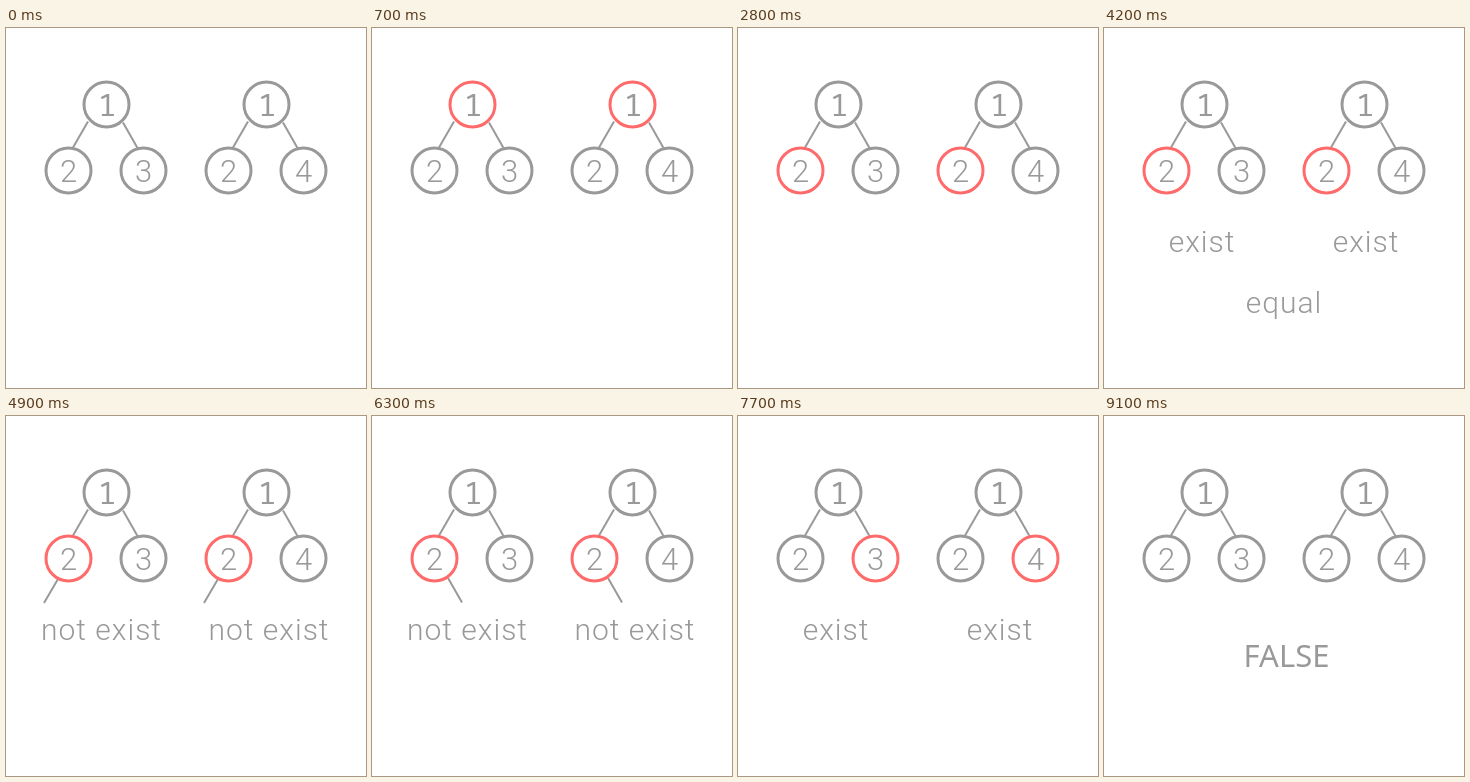
These frames come from a looping animation (360x360 px, 9800 ms). An HTML page:

```html
<!DOCTYPE html>
<html lang="en">
<head>
<meta charset="utf-8">
<title>Comparing two trees</title>
<style>
  html, body { margin: 0; width: 100%; height: 100%; overflow: hidden; background: #fff; }
  svg { display: block; width: 100%; height: 100%; }
  circle { fill: #fff; stroke: #999; stroke-width: 3; }
  circle.active { stroke: #ff6b6b; }
  line { stroke: #999; stroke-width: 2; }
  text { fill: #999; text-anchor: middle; font: 300 31px Roboto, sans-serif; font-stretch: 80%; }
  text.one { font-family: "Noto Sans Mono", monospace; }
  text.word { font-size: 30px; letter-spacing: 1px; }
  text.result { font: 400 31px "Noto Sans", sans-serif; }
</style>
</head>
<body>
<svg id="stage" viewBox="0 0 360 360"></svg>
<script>
const STEP = 700;
const stage = document.getElementById("stage");

// Each step: active node, word under the trees, verdict, side of the missing child.
const steps = [
  {},
  { node: "root" },
  { node: "root", word: "exist" },
  { node: "root", word: "exist", verdict: "equal" },
  { node: "left" },
  { node: "left", word: "exist" },
  { node: "left", word: "exist", verdict: "equal" },
  { node: "left", word: "not exist", child: "left" },
  { node: "left", word: "not exist", child: "left", verdict: "equal" },
  { node: "left", word: "not exist", child: "right" },
  { node: "left", word: "not exist", child: "right", verdict: "equal" },
  { node: "right", word: "exist" },
  { node: "right", word: "exist", verdict: "not equal" },
  { result: "FALSE" }
];

const wordCenters = { "exist": [98, 262], "not exist": [95.5, 263] };
const childLines = { left: [52, 163, 38, 187], right: [76, 162, 90, 186.5] };

const line = ([x1, y1, x2, y2]) =>
  `<line x1="${x1}" y1="${y1}" x2="${x2}" y2="${y2}"/>`;

const label = (x, y, str, kind = "") =>
  `<text class="${kind}" x="${x}" y="${y}">${str}</text>`;

const node = (x, y, value, active) =>
  `<circle class="${active ? "active" : ""}" cx="${x}" cy="${y}" r="22.5"/>` +
  label(x + (value === 1 ? 0.5 : 0), y + 11.5, value, value === 1 ? "one" : "");

const tree = (offset, rightValue, step) =>
  `<g transform="translate(${offset} 0)">` +
  line([82, 93.5, 67, 119.5]) +
  line([117, 94.5, 131.5, 120]) +
  (step.child ? line(childLines[step.child]) : "") +
  node(100.5, 76.5, 1, step.node === "root") +
  node(62.5, 142.5, 2, step.node === "left") +
  node(137.5, 142.5, rightValue, step.node === "right") +
  "</g>";

function draw(step) {
  let out = tree(0, 3, step) + tree(160, 4, step);
  if (step.word) {
    for (const x of wordCenters[step.word]) out += label(x, 224, step.word, "word");
  }
  if (step.verdict) out += label(180, 284.5, step.verdict, "word");
  if (step.result) out += label(182.5, 251, step.result, "result");
  stage.innerHTML = out;
}

let shown = -1;
function tick() {
  const index = Math.floor(performance.now() / STEP) % steps.length;
  if (index !== shown) draw(steps[shown = index]);
  requestAnimationFrame(tick);
}
tick();
</script>
</body>
</html>
```
